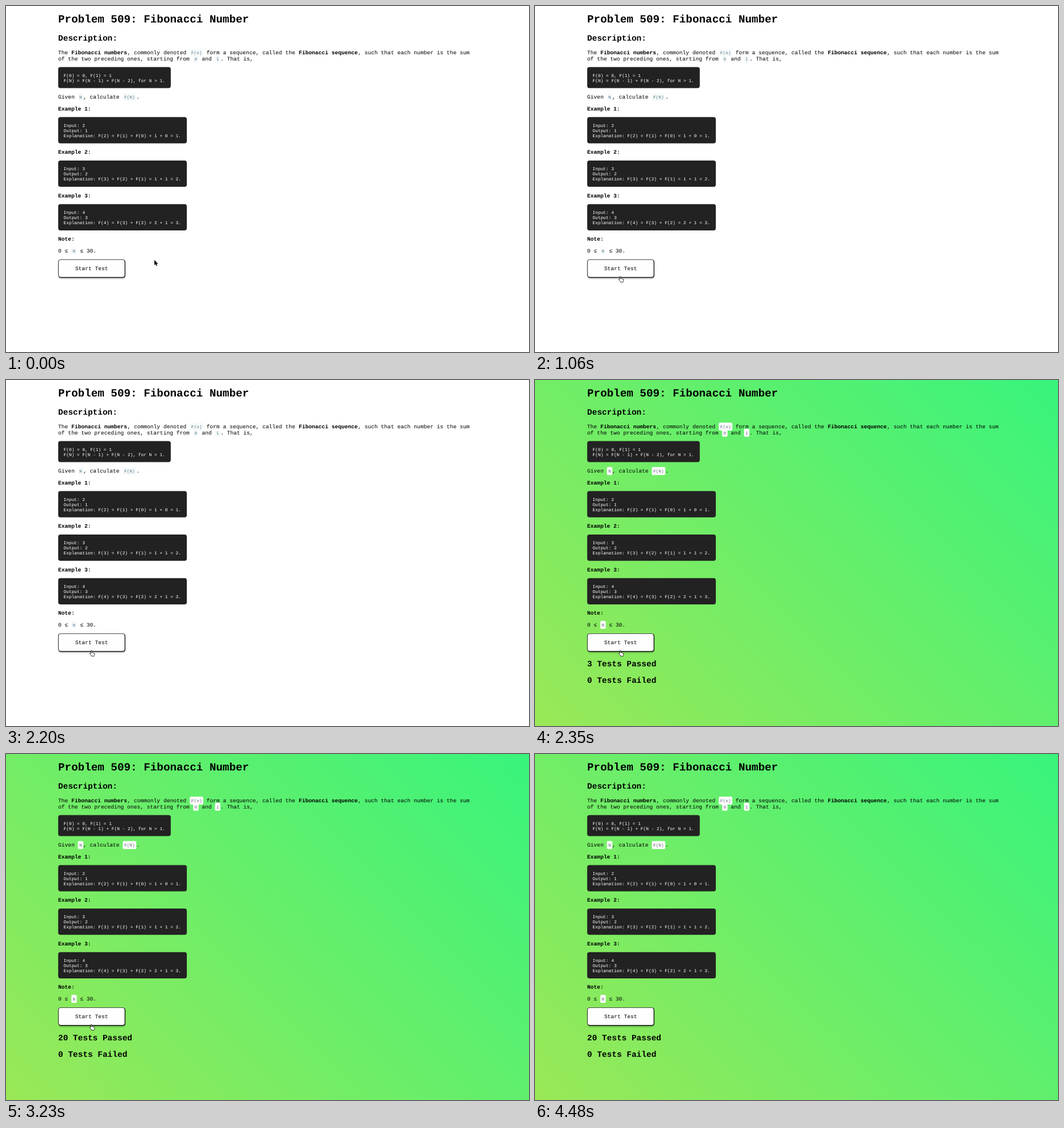
An HTML page that plays this animation: 920x609 px, repeating every 4830 ms.

```html
<!DOCTYPE html>
<html lang="en">
<head>
<meta charset="utf-8">
<title>Fibonacci Number</title>
<style>
html, body { margin: 0; width: 100%; height: 100%; overflow: hidden; background: #fff; }
svg { display: block; width: 920px; height: 609px; }
text { font-family: "Liberation Mono", monospace; white-space: pre; text-rendering: geometricPrecision; }
.chip { fill: #f7fafb; }
.code { fill: #557c88; }
.passed .chip { fill: #fdfdfd; }
.passed .code { fill: #69677f; }
#result, #sky { visibility: hidden; }
.passed #result, .passed #sky { visibility: visible; }
</style>
</head>
<body>
<svg id="stage" viewBox="0 0 920 609">
  <defs>
    <linearGradient id="lime" gradientUnits="userSpaceOnUse" x1="77.75" y1="686.75" x2="842.25" y2="-77.75">
      <stop offset="0" stop-color="#9ae857"/>
      <stop offset="1" stop-color="#38f47c"/>
    </linearGradient>
    <filter id="soft" x="-10%" y="-30%" width="120%" height="170%"><feGaussianBlur stdDeviation="1"/></filter>
  </defs>
  <rect id="sky" width="920" height="609" fill="url(#lime)"/>
  <g id="page"></g>
  <g id="button">
    <rect x="92.8" y="448" width="116.6" height="31.4" rx="4" fill="#000" opacity=".5" filter="url(#soft)"/>
    <rect x="92.3" y="446.5" width="117" height="31" rx="4" fill="#fefefe"/>
    <g fill="none" stroke-width="1.2">
      <path id="lit" d="M93.5 476.3Q92.3 475.2 92.3 473.5V450.5Q92.3 446.5 96.3 446.5H205.3Q207 446.5 208.1 447.7"/>
      <path id="dark" d="M208.1 447.7Q209.3 448.8 209.3 450.5V473.5Q209.3 477.5 205.3 477.5H96.3Q94.6 477.5 93.5 476.3"/>
    </g>
  </g>
  <g id="result"></g>
  <path id="arrow" d="M0 0V9.2L2.1 7.3L3.6 10.5L5.1 9.8L3.7 6.7H6.5Z" fill="#000" stroke="#fff" stroke-width=".8" paint-order="stroke"/>
  <path id="hand" d="M3 5.8V1.5a.8.8 0 0 1 1.6 0V4.5q1.4-.5 1.7.5q1.3-.4 1.6.6q1.5-.2 1.5 1.2v1.4q0 1.2-.8 2v.7H4.3q-.2-1-1.3-2L.9 6.8q-.2-1.1.8-1.1z"
    fill="#fff" stroke="#000" stroke-width=".8" stroke-linejoin="round"/>
</svg>
<script>
const LOOP = 4830, LEFT = 91.8, BODY = 9.65, SMALL = 7.84, H1 = 19.3, H2 = 14.47;
const $ = id => document.getElementById(id);

function add(parent, tag, attrs, content = '') {
  const el = document.createElementNS('http://www.w3.org/2000/svg', tag);
  for (const key in attrs) el.setAttribute(key, attrs[key]);
  el.textContent = content;
  return parent.appendChild(el);
}

function label(x, y, size, content, attrs = {}, parent = $('page')) {
  return add(parent, 'text', { x, y, 'font-size': size, ...attrs }, content);
}

const bold = { 'font-weight': 700 };
const heading = (y, size, content, parent) => label(LEFT, y, size, content, bold, parent);

// A line of text: *bold* and `code` runs follow one another.
function line(y, source) {
  let x = LEFT;
  for (const run of source.match(/\*[^*]+\*|`[^`]+`|[^*`]+/g)) {
    const word = run.replace(/[*`]/g, '');
    if (run[0] === '`') {
      const width = word.length * SMALL * 0.6 + 4.8;
      add($('page'), 'rect', { class: 'chip', x, y: y - 9.9, width, height: 14, rx: 1.8 });
      label(x + 2.4, y, SMALL, word, { class: 'code' });
      x += width;
    } else {
      label(x, y, BODY, word, run[0] === '*' ? bold : {});
      x += word.length * BODY * 0.6;
    }
  }
}

function block(y, lines) {
  const longest = Math.max(...lines.map(s => s.length));
  add($('page'), 'rect', {
    x: LEFT, y, width: longest * SMALL * 0.6 + 19.3, height: lines.length * 9.1 + 18.9, rx: 4, fill: '#222'
  });
  lines.forEach((s, i) => label(LEFT + 9.5, y + 17.1 + i * 9.1, SMALL, s, { fill: '#fff' }));
}

heading(29, H1, 'Problem 509: Fibonacci Number');
heading(60.8, H2, 'Description:');
line(84.8, 'The *Fibonacci numbers*, commonly denoted `F(n)` form a sequence, called the *Fibonacci sequence*, such that each number is the sum');
line(95.6, 'of the two preceding ones, starting from `0` and `1`. That is,');
block(107.5, ['F(0) = 0, F(1) = 1', 'F(N) = F(N - 1) + F(N - 2), for N > 1.']);
line(163.2, 'Given `N`, calculate `F(N)`.');
[
  [2, 1, 'F(2) = F(1) + F(0) = 1 + 0 = 1.'],
  [3, 2, 'F(3) = F(2) + F(1) = 1 + 1 = 2.'],
  [4, 3, 'F(4) = F(3) + F(2) = 2 + 1 = 3.']
].forEach(([input, output, why], i) => {
  const y = 183.7 + i * 76.6;
  line(y, `*Example ${i + 1}:*`);
  block(y + 11.8, ['Input: ' + input, 'Output: ' + output, 'Explanation: ' + why]);
});
line(413.4, '*Note:*');
line(433.9, '0 ≤ `N` ≤ 30.');
label(121.8, 465.2, BODY, 'Start Test', {}, $('button'));
const passed = heading(503.8, H2, '', $('result'));
heading(532.8, H2, '0 Tests Failed', $('result'));

// [start, x, y, shape]
const pointer = [
  [0, 261, 447, 'arrow'], [170, 239, 472.5, 'arrow'], [380, 205, 492, 'arrow'],
  [490, 169.8, 505.5, 'arrow'], [670, 160, 507, 'arrow'], [820, 157, 500, 'arrow'],
  [940, 152, 486, 'arrow'], [1060, 146.4, 475.2, 'hand'], [3620, 262, 483, 'arrow'],
  [3770, 775, 509, 'arrow'], [3920, 843, 520.5, 'arrow'], [4070, 892.3, 561.3, 'arrow'],
  [4180, 0, 0, ''], [4330, 917.8, 600.6, 'arrow'], [4480, 0, 0, '']
];
const counts = [[0, 0], [2350, 3], [2500, 6], [2670, 10], [2820, 12], [2940, 15], [3090, 18], [3230, 20]];
const at = (steps, t) => steps.findLast(step => step[0] <= t);

function draw(t) {
  $('stage').classList.toggle('passed', t >= 2350);
  passed.textContent = at(counts, t)[1] + ' Tests Passed';

  const pressed = t >= 2080 && t < 2200;
  $('lit').setAttribute('stroke', pressed ? '#000' : '#4c4c4c');
  $('dark').setAttribute('stroke', pressed ? '#4c4c4c' : '#000');

  const [, x, y, shape] = at(pointer, t);
  for (const id of ['arrow', 'hand']) {
    $(id).setAttribute('transform', `translate(${x} ${y})`);
    $(id).setAttribute('visibility', id === shape ? 'visible' : 'hidden');
  }
}

function tick() {
  draw(performance.now() % LOOP);
  requestAnimationFrame(tick);
}
tick();
</script>
</body>
</html>
```
